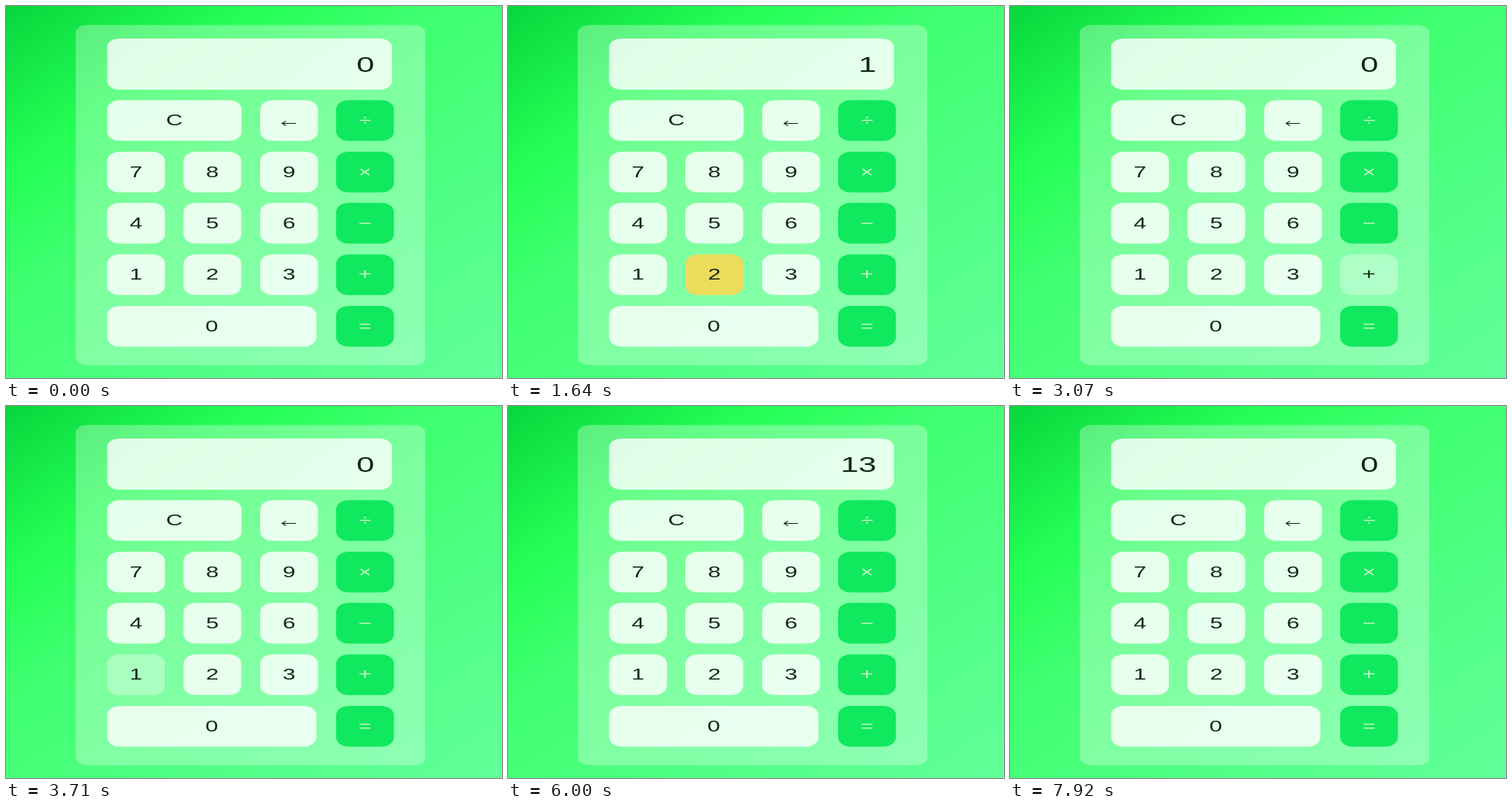
Write an HTML page that moves like this. It is 640 px wide and 480 px high and loops after 8 s.

```html
<!DOCTYPE html>
<html lang="en">
<head>
<meta charset="utf-8">
<title>Calculator</title>
<style>
  html, body { margin: 0; width: 100%; height: 100%; overflow: hidden; background: #40ff70; }
  svg { display: block; width: 640px; height: 480px; }
  text { font-family: "Liberation Sans", Arial, sans-serif; fill: #122816; }
  .label { font-size: 20px; text-anchor: middle; }
  .readout { font-size: 28px; text-anchor: end; }
</style>
</head>
<body>
<svg viewBox="0 0 640 480" xmlns="http://www.w3.org/2000/svg">
  <defs>
    <linearGradient id="bg" gradientUnits="userSpaceOnUse" x1="0" y1="0" x2="456" y2="456" gradientTransform="scale(1.48 1)">
      <stop offset="0" stop-color="#08d63c"/>
      <stop offset=".24" stop-color="#24ff56"/>
      <stop offset=".42" stop-color="#40ff70"/>
      <stop offset="1" stop-color="#62ff9a"/>
    </linearGradient>
  </defs>
  <rect width="640" height="480" fill="url(#bg)"/>
  <rect x="90" y="24.5" width="451" height="439" rx="15" ry="10" fill="#fff" fill-opacity=".3"/>
  <rect x="130.5" y="42" width="367.5" height="66" rx="16" ry="11" fill="#fff" fill-opacity=".8"/>
  <g id="keys"></g>
</svg>
<script>
const LOOP = 8000;
const STRETCH = 1.48; // the whole calculator is shown wider than it was laid out
const COLUMNS = [130.5, 229, 328, 426];
const ROWS = [121.5, 188, 254, 320.5, 387];
const KEY_W = 74.5, KEY_H = 52.5;

const IDLE = { fill: "#fff", "fill-opacity": 0.82 };
const OPERATOR = { fill: "#10e85e", "fill-opacity": 1 };
const HOVER = { fill: "#fff", "fill-opacity": 0.34 };
const ACTIVE = { fill: "#ebdc5c", "fill-opacity": 1 };

const layer = document.getElementById("keys");

function add(tag, attrs, content = "") {
  const el = document.createElementNS("http://www.w3.org/2000/svg", tag);
  setAll(el, attrs);
  el.textContent = content;
  return layer.appendChild(el);
}

function setAll(el, attrs) {
  for (const name in attrs) el.setAttribute(name, attrs[name]);
}

function addText(x, baseline, content, className) {
  return add("text", {
    class: className,
    transform: `translate(${x} ${baseline}) scale(${STRETCH} 1)`
  }, content);
}

const keys = {};

function addKey(name, col, row, width = KEY_W) {
  const x = COLUMNS[col], y = ROWS[row];
  const operator = col === 3;
  const box = add("rect", { x, y, width, height: KEY_H, rx: 16, ry: 12 });
  const cx = x + width / 2;
  let label;
  if (name === "←") {
    label = add("path", {
      d: `M${cx - 8} ${y + 30}h17m-13 -3l-5 3l5 3`,
      fill: "none", stroke: "#122816", "stroke-width": 1.1
    });
  } else {
    label = addText(cx, y + 32.5, name, "label");
  }
  keys[name] = { box, label, operator };
}

addKey("C", 0, 0, 173.5);
addKey("←", 2, 0);
["789", "456", "123"].forEach((digits, i) =>
  [...digits].forEach((digit, col) => addKey(digit, col, i + 1)));
addKey("0", 0, 4, 270);
[..."÷×−+="].forEach((name, row) => addKey(name, 3, row));

const readout = addText(475.3, 84.5, "0", "readout");

// Each click: key, pointer enters, button goes down, button goes up, pointer leaves, new readout
const CLICKS = [
  ["1", 850, 1210, 1280, 1430, "1"],
  ["2", 1500, 1640, 1710, 2000, "12"],
  ["+", 2350, 2920, 3070, 3280, "0"],
  ["1", 3640, 4000, 4070, 4280, "1"],
  ["=", 4280, 4570, 4920, 5500, "13"],
  ["+", 6640, 7420, 7710, 7920, "0"]
];

function render(time) {
  let shown = "0", current = null, pressed = false;
  for (const [name, enter, down, up, leave, result] of CLICKS) {
    if (time >= up) shown = result;
    if (time >= enter && time < leave) {
      current = name;
      pressed = time >= down && time < up;
    }
  }
  if (readout.textContent !== shown) readout.textContent = shown;
  for (const name in keys) {
    const { box, label, operator } = keys[name];
    const over = name === current;
    setAll(box, over ? (pressed ? ACTIVE : HOVER) : operator ? OPERATOR : IDLE);
    if (operator) label.style.fill = over ? "#122816" : "#c9f5c4";
  }
}

const start = performance.now();
function tick() {
  render((performance.now() - start) % LOOP);
  requestAnimationFrame(tick);
}
tick();
</script>
</body>
</html>
```
